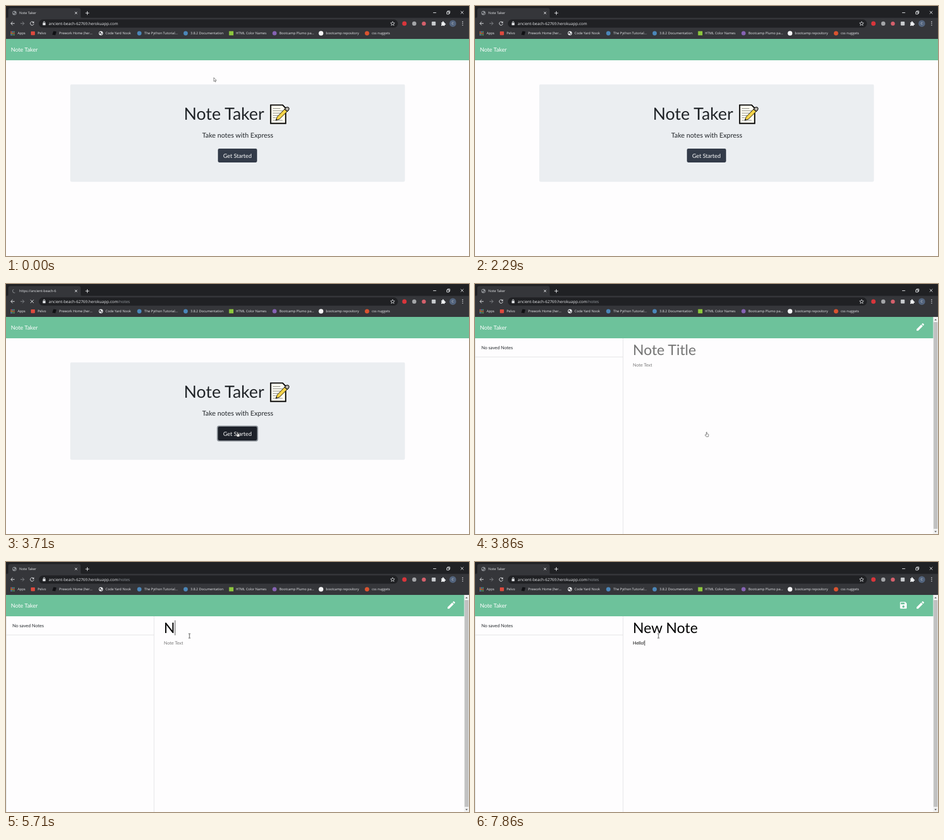
An HTML page for the animation above (8000 ms loop, 800 px wide and 433 px high).

```html
<!DOCTYPE html>
<html lang="en">
<head>
<meta charset="utf-8">
<title>Note Taker</title>
<style>
  html, body { margin: 0; width: 100%; height: 100%; overflow: hidden; background: #fefdfe; }
  svg { display: block; width: 100%; height: 100%; }
  text { font-family: Lato, sans-serif; text-rendering: geometricPrecision; white-space: pre; }
  .ui text { font: 5.85px "Open Sans", "Noto Sans", sans-serif; fill: #e8eaed; }
  .ui .url { font-size: 6.9px; }
  .line { fill: none; stroke: #e4e6e9; stroke-width: 1; }
  .dim { stroke: #85878b; }
  .base { font-size: 7.81px; }
  .big { font-size: 25px; }
  .ink { fill: #212529; }
  .hint { fill: #757575; }
</style>
</head>
<body>
<svg viewBox="0 0 800 433">
  <defs>
    <linearGradient id="fade" gradientUnits="userSpaceOnUse" x1="104" x2="116" y1="0" y2="0">
      <stop offset="0" stop-color="#e8eaed"/><stop offset="1" stop-color="#e8eaed" stop-opacity=".25"/>
    </linearGradient>
    <g id="globe">
      <circle r="3.6"/>
      <path d="M-2.4-1.6Q-.6-2.8.2-1.2T-1 .6-2.6 0ZM.6.6 2.6.2 1.6 2.4.4 2Z" fill="#35363a"/>
    </g>
  </defs>

  <g id="home">
    <rect x="111" y="135.7" width="578.3" height="168.7" rx="2.4" fill="#ebeef1"/>
    <text x="307.3" y="197.3" font-size="29.17" class="ink">Note Taker</text>
    <g id="memo">
      <path d="M457.3 171.5H478L483.3 177V203.3H457.3Z" fill="#fffef4" stroke="#fff" stroke-width="4"/>
      <path d="M457.3 171.5H478L483.3 177V203.3H457.3Z" fill="#fffdf0" stroke="#0c0c0c" stroke-width="2.2"/>
      <path d="M461 177.5H474M461 181.5H479M461 185.5H474M461 189.5H470M461 193.5H466M461 198H478" stroke="#8d8d88" stroke-width="1" fill="none"/>
      <path d="M466.2 198.2 468.3 192.2 483.7 176.3 488.3 180.2 472.5 196Z" fill="#f3cf3a" stroke="#191919" stroke-width="1"/>
      <path d="M481.4 178.6 484.2 175.6Q487.4 174.2 489 177.2 489.6 179.2 486 182.6Z" fill="#b9b5ad" stroke="#191919" stroke-width="1.3"/>
      <path d="M470.5 194.3 482 182.3" stroke="#fae684" stroke-width="1"/>
      <path d="M466.2 198.2 467.2 195.2 469 197.2Z" fill="#191919"/>
    </g>
    <text x="339" y="227.8" font-size="11.72" class="ink">Take notes with Express</text>
    <rect id="ring" x="364.4" y="245.3" width="71.2" height="27.4" rx="4" fill="#8e949b"/>
    <rect id="button" x="366.2" y="247" width="67.6" height="24" rx="2.4"/>
    <text x="375.2" y="262.6" font-size="9.77" fill="#fff">Get Started</text>
  </g>

  <g id="notes">
    <path d="M.5 94V433M255.8 94V433M0 126.4H256" fill="none" stroke="#dedfe0" stroke-width=".8"/>
    <text x="11" y="113" class="base ink">No saved Notes</text>
    <text id="title" x="272.8" y="123" class="big"></text>
    <text id="body" x="272.8" y="143.2" class="base"></text>
    <rect id="caret" width=".8" fill="#222"/>
  </g>

  <rect y="57" width="800" height="37" fill="#6dc29b"/>
  <text x="8.4" y="79" font-size="9.77" fill="#fff">Note Taker</text>

  <g id="tools" fill="#fff">
    <path d="M763 78.3 771 70.3 773.7 73 765.7 81H763ZM771.8 69.5 773 68.3Q773.7 67.8 774.4 68.4L775.7 69.7Q776.2 70.3 775.7 71L774.5 72.2Z"/>
    <path id="save" fill-rule="evenodd" d="M735.8 69H743.3L746 71.7V79.6Q746 80.8 744.8 80.8H735.8Q734.5 80.8 734.5 79.6V70.3Q734.5 69 735.8 69ZM735.8 70.3V73.2H742.3V70.3ZM740.2 75.2A2 2 0 1 0 740.3 75.2Z"/>
    <rect x="791.6" y="57" width="8.4" height="376" fill="#f1f1f1"/>
    <rect x="792.4" y="66" width="6.9" height="358" fill="#c1c1c1"/>
    <path d="M793.8 63 795.8 60.6 797.8 63ZM793.8 427.8 795.8 430.2 797.8 427.8Z" fill="#606060"/>
  </g>

  <g class="ui">
    <rect width="800" height="21" fill="#202124"/>
    <path d="M1 21Q4 21 4 18V7Q4 3.5 7.5 3.5H125.5Q129 3.5 129 7V18Q129 21 132 21Z" fill="#35363a"/>
    <rect y="20.5" width="800" height="36.5" fill="#35363a"/>
    <rect x="56.8" y="23.3" width="620.4" height="14.2" rx="7.1" fill="#202124"/>

    <g id="idle">
      <use href="#globe" x="14.6" y="12.2" fill="#8d9095"/>
      <text x="23" y="14.2">Note Taker</text>
      <path class="line" d="M47.2 28A3.1 3.1 0 1 0 48.1 30.8"/>
      <path d="M48.4 26.4V29.6H45.2Z" fill="#e4e6e9"/>
    </g>
    <g id="busy">
      <path id="spin" class="line dim" d="M14.5 9.2A3 3 0 0 0 14.5 15.2"/>
      <text x="23" y="14.2" style="fill:url(#fade)">https://ancient-beach-6</text>
      <path class="line" d="M42.2 27.4 47.8 33M47.8 27.4 42.2 33"/>
    </g>
    <path class="line" d="M119 10.1 123 14.1M123 10.1 119 14.1M137.3 12.2H143.7M140.5 9V15.4"/>
    <path class="line" stroke-width=".8" d="M738 11.6H743.3M761.7 10.2H765.5V14H761.7ZM763 10V8.7H766.9V12.6H765.6M785.7 8.8 790.5 13.6M790.5 8.8 785.7 13.6"/>
    <path class="line" d="M14.8 30.2H8.5M11.5 27.1 8.4 30.2 11.5 33.3"/>
    <path class="line dim" d="M25 30.2H31.3M28.3 27.1 31.4 30.2 28.3 33.3"/>
    <rect x="63.5" y="29.3" width="4.8" height="4" rx=".5" fill="#e4e6e9"/>
    <path class="line" stroke-width=".8" d="M64.6 29.4V28.2Q64.7 26.9 65.9 26.9T67.2 28.2V29.4"/>
    <text class="url" x="73.8" y="32.9">ancient-beach-62769.herokuapp.com<tspan id="path" fill="#9aa0a6">/notes</tspan></text>
    <path class="line" style="stroke-width:.8" d="M668 26.8 669 29.2 671.6 29.4 669.6 31.1 670.3 33.6 668 32.2 665.7 33.6 666.4 31.1 664.4 29.4 667 29.2Z"/>

    <circle cx="688.4" cy="30.4" r="3.8" fill="#d8353b"/>
    <circle cx="705.4" cy="30.4" r="3.6" fill="#a3a5a8"/>
    <circle cx="722" cy="30.4" r="3.5" fill="#d4606c"/>
    <rect x="735.6" y="27" width="6.8" height="6.8" rx="1" fill="#c9cccf"/>
    <path d="M752 28.4H754V27.6A1.2 1.2 0 0 1 756.4 27.6V28.4H758V30.2H758.6A1.2 1.2 0 0 1 758.6 32.6H758V34.3H755.9A1.2 1.2 0 0 0 753.8 34.3H752V32.3A1.2 1.2 0 0 0 752 30Z" fill="#eef0f2"/>
    <circle cx="772" cy="30.4" r="5.8" fill="#53647d"/>
    <text x="770.2" y="32.4" style="font-size:5.4px">C</text>
    <g fill="#e4e6e9"><circle cx="789" cy="27.4" r=".8"/><circle cx="789" cy="30.3" r=".8"/><circle cx="789" cy="33.2" r=".8"/></g>

    <g id="apps"></g>
    <rect x="43" y="44" width="7" height="6.4" rx=".8" fill="#dc4a3e"/>
    <path d="M82 43.4 87 44.2 85.4 50.6 80 49.8Z" fill="#101114"/>
    <use href="#globe" x="164" y="47.2" fill="#e6e8ea"/>
    <circle cx="230.4" cy="47.2" r="3.7" fill="#4b86b8"/>
    <circle cx="310.4" cy="47.2" r="3.7" fill="#4b86b8"/>
    <rect x="385.4" y="43.6" width="7.6" height="7.2" fill="#8cc63e"/>
    <circle cx="464" cy="47.2" r="3.6" fill="#8663b4"/>
    <circle cx="544.3" cy="47.2" r="4" fill="#f4f5f6"/>
    <circle cx="623.8" cy="47.2" r="3.8" fill="#d9532f"/>
    <g id="marks"></g>
  </g>

  <path id="arrow" d="M0 0V6.6L1.5 5.3 2.6 7.6 3.6 7.1 2.6 4.9H4.6Z" fill="#fff" stroke="#333" stroke-width=".6"/>
  <path id="hand" d="M-.9-3.6Q-.2-4.5.4-3.6V-.9L2.6-.4Q3.5 0 3.3 1L2.6 4H-1L-3 1.2Q-2.8.1-1.8.6L-.9 1.3Z" fill="#fff" stroke="#333" stroke-width=".6"/>
  <path id="beam" d="M-1.7-3.8H-.5L0-3.4.5-3.8H1.7M0-3.4V3.4M-1.7 3.8H-.5L0 3.4.5 3.8H1.7" fill="none" stroke="#222" stroke-width=".8"/>
</svg>
<script>
const el = id => document.getElementById(id);
const show = (id, on) => el(id).style.display = on ? '' : 'none';
const ns = 'http://www.w3.org/2000/svg';

function add(parent, tag, attrs, text = '') {
  const node = document.createElementNS(ns, tag);
  for (const k in attrs) node.setAttribute(k, attrs[k]);
  node.textContent = text;
  el(parent).append(node);
}

const dots = ['#e0564b', '#e0a33c', '#53a866', '#5b8fe0'];
for (let i = 0; i < 9; i++) {
  add('apps', 'rect', {
    x: 8 + i % 3 * 2.6, y: 43.8 + Math.floor(i / 3) * 2.6,
    width: 1.8, height: 1.8, fill: dots[(i * 3 + (i >> 2)) % 4]
  });
}

const marks = [
  [20, 'Apps'], [54.5, 'Pelvo'], [91.7, 'Prework Home (her...'], [172, 'Code Yard Nook'],
  [239, 'The Python Tutorial...'], [318.8, '3.8.2 Documentation'], [397.3, 'HTML Color Names'],
  [472.3, 'Bootcamp Plumo pa...'], [552.8, 'bootcamp repository'], [632, 'css nuggets']
];
for (const [x, label] of marks) add('marks', 'text', { x, y: 49.3 }, label);

// The picture advances at 7 ticks per second; all times below are in ticks.
const RATE = 7, LOOP = 56;
const HOVER = 22, CLICK = 24, LOADED = 27, FOCUS = 37, TAB = 46;
const titleKeys = [[40, 'N'], [41, 'Ne'], [42, 'New'], [43, 'New N'], [44, 'New No'], [45, 'New Note']];
const bodyKeys = [[48, 'H'], [49, 'He'], [50, 'Hel'], [51, 'Hell'], [52, 'Hello'], [54, 'Hello!']];
const trail = [
  [0, 359, 124], [2, 384, 381], [10, 384, 381], [12, 388, 414], [13, 390, 436],
  [16, 424, 436], [17, 422, 425], [23, 400.5, 260.5], [27, 400.5, 260.5],
  [31, 322, 134], [34, 317, 128], [LOOP, 317, 128]
];

const typed = (keys, n) => keys.reduce((s, [at, str]) => n >= at ? str : s, '');

function pointer(n) {
  const i = trail.findIndex(p => p[0] > n);
  const [t0, x0, y0] = trail[i - 1], [t1, x1, y1] = trail[i];
  const u = (n - t0) / (t1 - t0), e = u * (2 - u);
  return [x0 + (x1 - x0) * e, y0 + (y1 - y0) * e];
}

function field(id, value, hint) {
  el(id).textContent = value || hint;
  el(id).classList.toggle('hint', !value);
  return value ? el(id).getComputedTextLength() : 0;
}

function draw(n) {
  const notes = n >= LOADED, busy = n >= CLICK && !notes, inBody = n >= TAB;
  show('home', !notes);
  show('notes', notes);
  show('tools', notes);
  show('idle', !busy);
  show('busy', busy);
  show('path', n >= CLICK);
  show('ring', busy);
  el('button').setAttribute('fill', busy ? '#1d2129' : n >= HOVER ? '#23272f' : '#333b49');
  el('spin').setAttribute('transform', `rotate(${-n * 70} 14.5 12.2)`);

  if (notes) {
    const body = typed(bodyKeys, n);
    const wTitle = field('title', typed(titleKeys, n), 'Note Title');
    const wBody = field('body', body, 'Note Text');
    const caret = el('caret');
    show('caret', n >= FOCUS);
    caret.setAttribute('x', 272.6 + (inBody ? wBody : wTitle));
    caret.setAttribute('y', inBody ? 135.6 : 101);
    caret.setAttribute('height', inBody ? 9.4 : 26);
    show('save', body);
  }

  const shape = n > LOADED ? 'beam' : n >= HOVER ? 'hand' : 'arrow';
  const [x, y] = pointer(n);
  for (const id of ['arrow', 'hand', 'beam']) show(id, id === shape);
  el(shape).setAttribute('transform', `translate(${x} ${y})`);
}

let start, last = -1;
function frame(now) {
  start ??= now;
  const n = Math.floor((now - start + 5) * RATE / 1000) % LOOP;
  if (n !== last) draw(last = n);
  requestAnimationFrame(frame);
}
draw(0);
requestAnimationFrame(frame);
</script>
</body>
</html>
```
